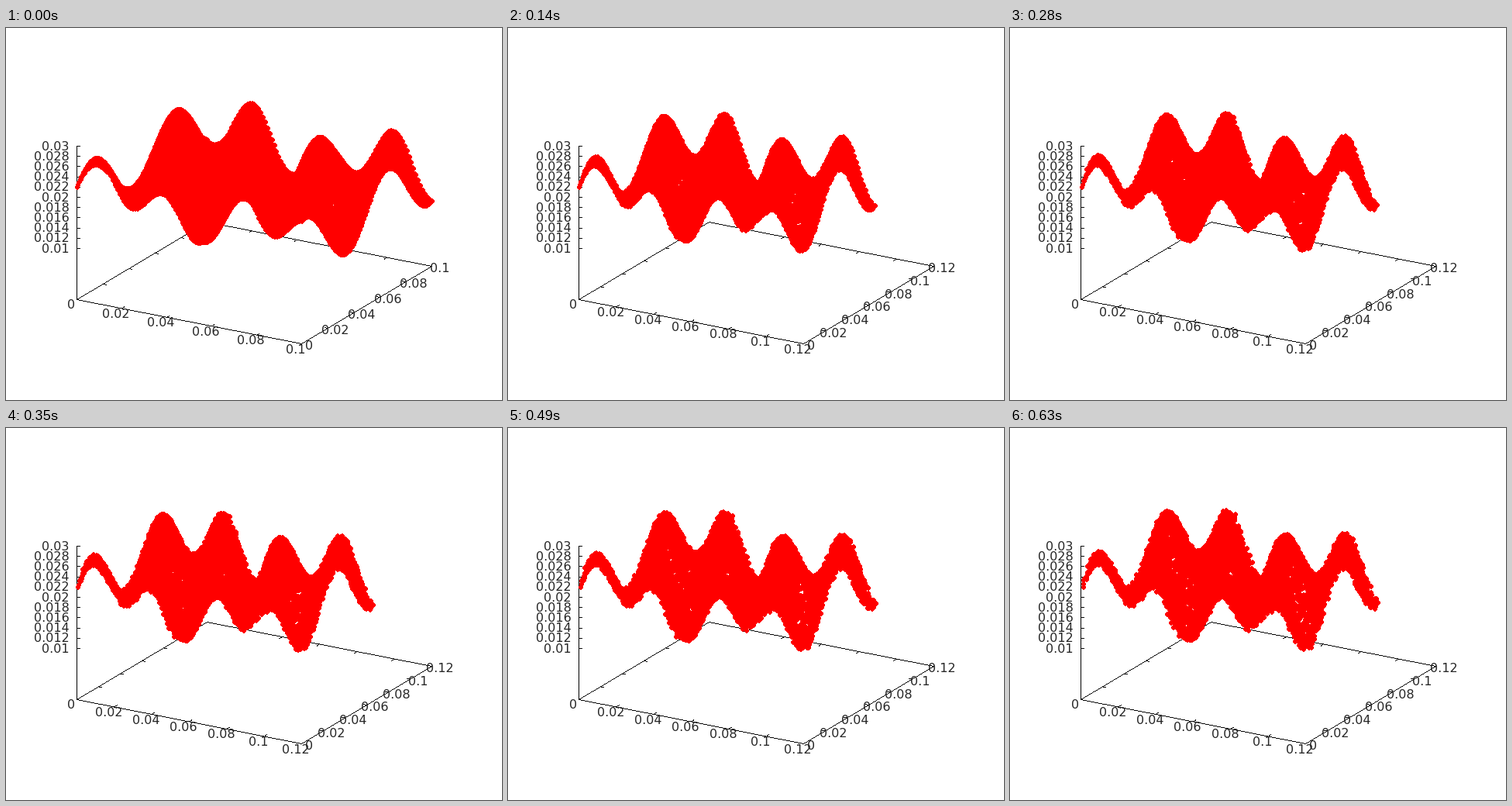
A matplotlib script for the animation above (0.7 s loop, 640 px wide and 480 px high).

```python
import numpy as np
import matplotlib.pyplot as plt
from matplotlib.animation import FuncAnimation

W, H = 640, 480
FRAMES, STEP_MS = 10, 70
SIDE = 0.1            # edge of the particle sheet
MAX_SPEED = 1.5e-4    # largest drift per step and axis
RED = 255, 0, 0

plt.rcParams["font.family"] = "DejaVu Sans"
fig = plt.figure(figsize=(W / 72, H / 72), dpi=72, facecolor="white")
ax = fig.add_axes([0, 0, 1, 1])
ax.axis("off")


def project(u, v, z=0.0):
    """Box fractions u, v and height z to pixel coordinates."""
    return 91 + 290 * u + 168 * v, 350 + 57 * u - 100 * v - 6600 * z


def line(canvas, p, q):
    """Hard one-pixel black line."""
    n = int(np.ceil(max(abs(q[0] - p[0]), abs(q[1] - p[1])))) + 1
    x, y = (np.rint(np.linspace(a, b, n)).astype(int) for a, b in zip(p, q))
    canvas[y, x] = 0


def label(x, y, value, ha="center"):
    return ax.text(x, y + 5, f"{value:g}", size=16, color="0.15",
                   ha=ha, va="baseline")


def tick(canvas, u, v, du, dv):
    """Short mark on the base, pointing along (du, dv)."""
    p = np.array(project(u, v))
    d = np.array(project(u + du, v + dv)) - p
    line(canvas, p, p + 4 * d / np.hypot(*d))


def base_scale(limit):
    """Box with base ticks for 0..limit, and the matching numbers."""
    canvas, labels = box.copy(), []
    for value in np.arange(0, limit + 0.01, 0.02):
        t = value / limit
        tick(canvas, t, 0, 0, 1)
        tick(canvas, t, 1, 0, -1)
        tick(canvas, 0, t, 1, 0)
        tick(canvas, 1, t, -1, 0)
        x, y = project(t, 0)
        labels.append(label(x - 7.5, y + 7, value))
        x, y = project(1, t)
        labels.append(label(x + 10, y + 2.8, value))
    return canvas, labels


# Box and height axis
box = np.full((H, W, 3), 255, dtype=np.uint8)
corners = [(0, 0), (1, 0), (1, 1), (0, 1), (0, 0)]
for a, b in zip(corners, corners[1:]):
    line(box, project(*a), project(*b))
line(box, project(0, 0), project(0, 0, 0.03))
for height in np.arange(0.01, 0.0301, 0.002):
    x, y = project(0, 0, height)
    line(box, (x, y), (x + 4, y))
    label(81, y, round(height, 3), ha="right")

scales = {limit: base_scale(limit) for limit in (0.1, 0.12)}

# Particles on a wavy sheet, each with its own constant drift
grid = np.linspace(0, SIDE, 101)
gx, gy = np.meshgrid(grid, grid, indexing="ij")
gz = (0.02 + 0.002 * np.cos(100 * gy) + 0.003 * np.sin(100 * gx)
      + 0.004 * np.sin(200 * gx + 100 * gy))
start = np.array([gx, gy, gz])
drift = np.random.default_rng(4).random(start.shape) * MAX_SPEED
drift[:, 0, 0] = 9e-5, 9e-5, 0

# Round dot, six pixels wide and seven high
DOT = [(i, j) for i in range(-2, 4) for j in range(-3, 4)
       if np.hypot(i - 0.5, j) < 3.2]

picture = ax.imshow(box, interpolation="nearest", aspect="auto", zorder=0)
ax.set_xlim(-0.5, W - 0.5)
ax.set_ylim(H - 0.5, -0.5)


def draw(n):
    limit = 0.12 if n else 0.1
    for key, (_, labels) in scales.items():
        for text in labels:
            text.set_visible(key == limit)
    x, y, z = start + n * drift
    px, py = project(x / limit, y / limit, z)
    px, py = np.floor(px).astype(int), np.ceil(py).astype(int)
    canvas = scales[limit][0].copy()
    for i, j in DOT:
        canvas[py + j, px + i] = RED
    picture.set_data(canvas)
    return [picture]


anim = FuncAnimation(fig, draw, frames=FRAMES, interval=STEP_MS,
                     repeat=True, repeat_delay=0, blit=False)
plt.show()
```
